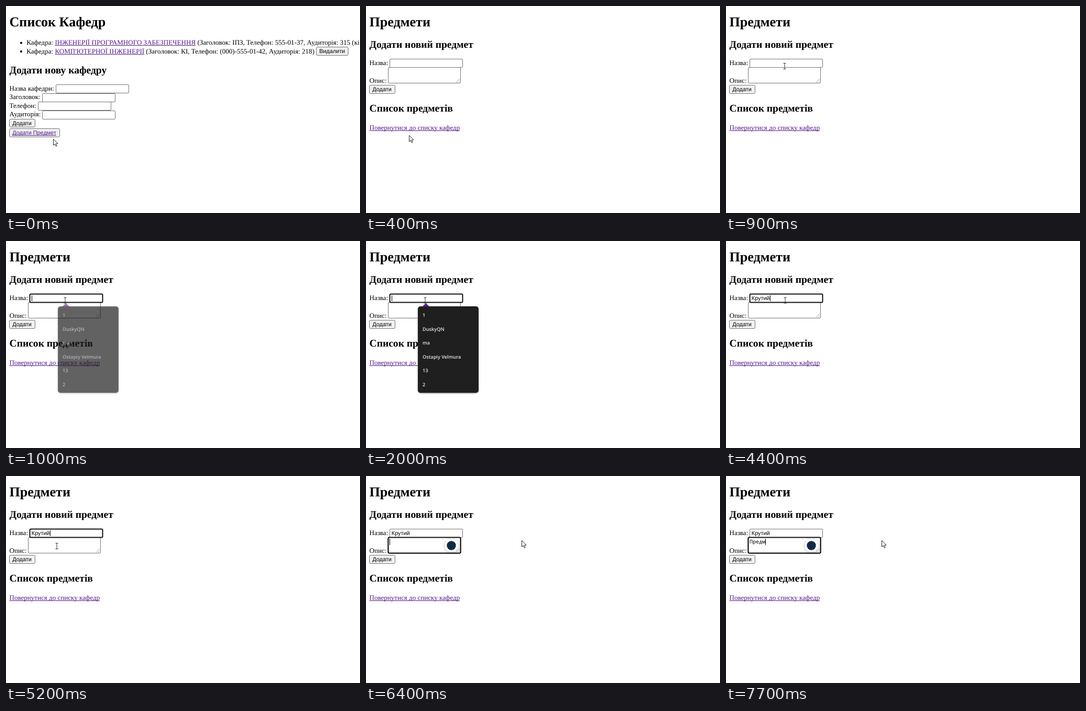
Animation of 676x396 px, one loop 8000 ms. Source, as an HTML page with a canvas:

```html
<!DOCTYPE html>
<html lang="uk">
<head>
<meta charset="utf-8">
<title>Предмети</title>
<style>
html, body { margin: 0; width: 100%; height: 100%; overflow: hidden; background: #fff; }
canvas { display: block; }
</style>
</head>
<body>
<canvas id="stage" width="676" height="396"></canvas>
<script>
const ctx = document.getElementById('stage').getContext('2d');
const LOOP = 8000, STEP = 100;

const SERIF = '"Liberation Serif", "Times New Roman", serif';
const SANS = '"Liberation Sans", Arial, sans-serif';
const H1 = 'bold 26.1px ' + SERIF;
const H2 = 'bold 19.57px ' + SERIF;
const BODY = '13.05px ' + SERIF;
const CONTROL = '10.87px ' + SANS;
const MONO = '9.97px "Noto Sans Mono", "DejaVu Sans Mono", monospace';
const MENU = '600 9.2px "Open Sans", "Noto Sans", sans-serif';
const INK = '#000', LINK = '#551a8b', EDGE = '#767676', FOCUS = '#101010';
const LEFT = 6.5;

// Pointer positions [ms, x, y, kind], held until the next one
const pointerPath = [
  [0, 90, 254, 'arrow'], [100, 88, 251, 'arrow'], [200, 84, 248, 'arrow'],
  [300, 82, 247, 'arrow'], [500, 122, 212, 'arrow'], [600, 163, 168, 'arrow'],
  [700, 139, 131, 'beam'], [800, 119, 119, 'beam'], [900, 112, 115, 'beam'],
  [1000, 113, 113.5, 'beam'], [4600, 88, 107, 'beam'], [4700, 30, 82, 'arrow'],
  [4800, 2, 70, 'arrow'], [4900, 12, 88, 'arrow'], [5000, 52, 122, 'beam'],
  [5100, 86, 132, 'beam'], [5200, 97, 134, 'beam'], [5500, 150, 132, 'beam'],
  [5600, 232, 131, 'arrow'], [5700, 297, 123, 'arrow']
];
const nameTyping = [[0, ''], [3200, 'К'], [4400, 'Крутий']];
const noteTyping = [[0, ''], [6700, 'Пре'], [7700, 'Предм']];
const suggestions = ['1', 'DuskyQN', 'ma', 'Ostapiy Velmura', '13', '2'];

const at = (track, t) => track.filter(k => k[0] <= t).pop();

// Draws text and returns the x where it ends
function text(str, x, y, font, color = INK, underline = false) {
  ctx.font = font;
  ctx.fillStyle = color;
  ctx.fillText(str, x, y);
  const end = x + ctx.measureText(str).width;
  if (underline) ctx.fillRect(x, Math.round(y + 1), end - x, 1);
  return end;
}

function box(x, y, w, h, r, fill, stroke, line = 1) {
  ctx.beginPath();
  ctx.roundRect(x, y, w, h, r);
  ctx.fillStyle = fill;
  ctx.fill();
  if (!stroke) return;
  ctx.strokeStyle = stroke;
  ctx.lineWidth = line;
  ctx.stroke();
}

function field(x, y, w, h, focused = false) {
  if (focused) box(x + .5, y + .5, w - 1, h - 1, 2, '#fff', FOCUS, 2);
  else box(x + .5, y + .5, w - 1, h - 1, 1.5, '#fff', EDGE);
}

function button(label, x, y, w, h, link = false) {
  box(x + .5, y + .5, w - 1, h - 1, 2.5, '#efefef', EDGE);
  text(label, x + 6.3, y + 12.2, CONTROL, link ? LINK : INK, link);
}

function caret(x, y, h) {
  ctx.fillStyle = INK;
  ctx.fillRect(Math.round(x), y, 1, h);
}

function department(y, name, details) {
  ctx.beginPath();
  ctx.arc(29, y - 3.5, 2.1, 0, 7);
  ctx.fillStyle = INK;
  ctx.fill();
  const x = text('Кафедра: ', 39.2, y, BODY);
  text(' ' + details, text(name, x, y, BODY, LINK, true), y, BODY);
}

function departmentsPage() {
  text('Список Кафедр', LEFT, 38.7, H1);
  department(74.2, 'ІНЖЕНЕРІЇ ПРОГРАМНОГО ЗАБЕЗПЕЧЕННЯ',
    '(Заголовок: ІПЗ, Телефон: 555-01-37, Аудиторія: 315 (кі');
  department(90.6, "КОМП'ЮТЕРНОЇ ІНЖЕНЕРІЇ",
    '(Заголовок: КІ, Телефон: (000)-555-01-42, Аудиторія: 218)');
  button('Видалити', 592, 78, 62, 17);

  text('Додати нову кафедру', LEFT, 129.2, H2);
  const rows = [['Назва кафедри:', 95], ['Заголовок:', 69], ['Телефон:', 61], ['Аудиторія:', 69]];
  rows.forEach(([label, x], i) => {
    text(label, LEFT, 161.8 + i * 16.5, BODY);
    field(x, Math.round(150 + i * 16.5), 140, 17);
  });
  button('Додати', 6, 216, 50, 16);
  button('Додати Предмет', 6, 234, 97, 17, true);
}

function subjectsPage(t) {
  const name = at(nameTyping, t)[1], note = at(noteTyping, t)[1];
  const onName = t >= 1000 && t < 5400, onNote = t >= 5400;

  text('Предмети', LEFT, 38.7, H1);
  text('Додати новий предмет', LEFT, 80.2, H2);
  text('Назва:', LEFT, 113.2, BODY);
  text('Опис:', LEFT, 147.2, BODY);

  field(42, 117, 139, 31, onNote);
  grip(179, 146);
  field(45, 101, 140, 17, onName);
  if (onNote) field(42, 117, 139, 31, true), grip(179, 146);

  const nameEnd = text(name, 48.8, 113.2, CONTROL);
  if (onName) caret(nameEnd, 104, 11);
  const noteEnd = text(note, 45, 129.2, MONO);
  if (onNote) caret(noteEnd, 120, 12);

  button('Додати', 6, 151, 50, 17);
  text('Список предметів', LEFT, 202.2, H2);
  text('Повернутися до списку кафедр', LEFT, 237.4, BODY, LINK, true);

  if (t >= 5500) badge(163, 133);
  if (t >= 1000 && t < 3200) suggestionMenu(t < 1100 ? .6 : 1);
}

// Resize corner of the text area
function grip(x, y) {
  ctx.strokeStyle = '#8a8a8a';
  ctx.lineWidth = .8;
  ctx.beginPath();
  for (const d of [7, 3]) {
    ctx.moveTo(x - d, y);
    ctx.lineTo(x, y - d);
  }
  ctx.stroke();
}

function shadow(color, blur, dy) {
  ctx.shadowColor = color;
  ctx.shadowBlur = blur;
  ctx.shadowOffsetY = dy;
}

function disc(x, y, r, color) {
  ctx.beginPath();
  ctx.arc(x, y, r, 0, 7);
  ctx.fillStyle = color;
  ctx.fill();
}

function badge(x, y) {
  ctx.save();
  shadow('rgba(0,0,0,.3)', 4, 1);
  disc(x, y, 13, '#fff');
  ctx.restore();
  disc(x, y, 8.7, '#0f2b46');
}

function suggestionMenu(alpha) {
  ctx.save();
  ctx.globalAlpha = alpha;
  ctx.save();
  shadow('rgba(0,0,0,.35)', 3, 1);
  box(99, 125, 116, 165.5, 5, '#1f1f1f');
  ctx.restore();
  ctx.beginPath();
  ctx.moveTo(107.5, 125.5);
  ctx.lineTo(114.3, 119);
  ctx.lineTo(121, 125.5);
  ctx.fill();
  suggestions.forEach((s, i) => text(s, 108, 145 + i * 26.5, MENU, '#e8e8e8'));
  ctx.restore();
}

function arrow(x, y) {
  const outline = [[0, 0], [0, 12], [2.8, 9.5], [4.8, 14], [6.7, 13.1], [4.8, 8.8], [8.6, 8.6]];
  ctx.beginPath();
  outline.forEach(([dx, dy]) => ctx.lineTo(x + .5 + dx, y + .5 + dy));
  ctx.closePath();
  ctx.fillStyle = '#fff';
  ctx.fill();
  ctx.strokeStyle = '#222';
  ctx.lineWidth = 1;
  ctx.stroke();
}

function beam(x, y) {
  ctx.beginPath();
  for (const s of [-1, 1]) {
    ctx.moveTo(x - 2.5, y + s * 5.5);
    ctx.lineTo(x + 2.5, y + s * 5.5);
  }
  ctx.moveTo(x, y - 5.5);
  ctx.lineTo(x, y + 5.5);
  ctx.strokeStyle = '#333';
  ctx.lineWidth = 1;
  ctx.stroke();
}

function draw(now) {
  const t = Math.floor((now % LOOP) / STEP) * STEP;
  ctx.fillStyle = '#fff';
  ctx.fillRect(0, 0, 676, 396);
  if (t < 300) departmentsPage();
  else subjectsPage(t);
  const [, x, y, kind] = at(pointerPath, t);
  (kind === 'arrow' ? arrow : beam)(x, y);
}

function tick() {
  draw(performance.now());
  requestAnimationFrame(tick);
}

ctx.textRendering = 'geometricPrecision';
tick();
</script>
</body>
</html>
```
